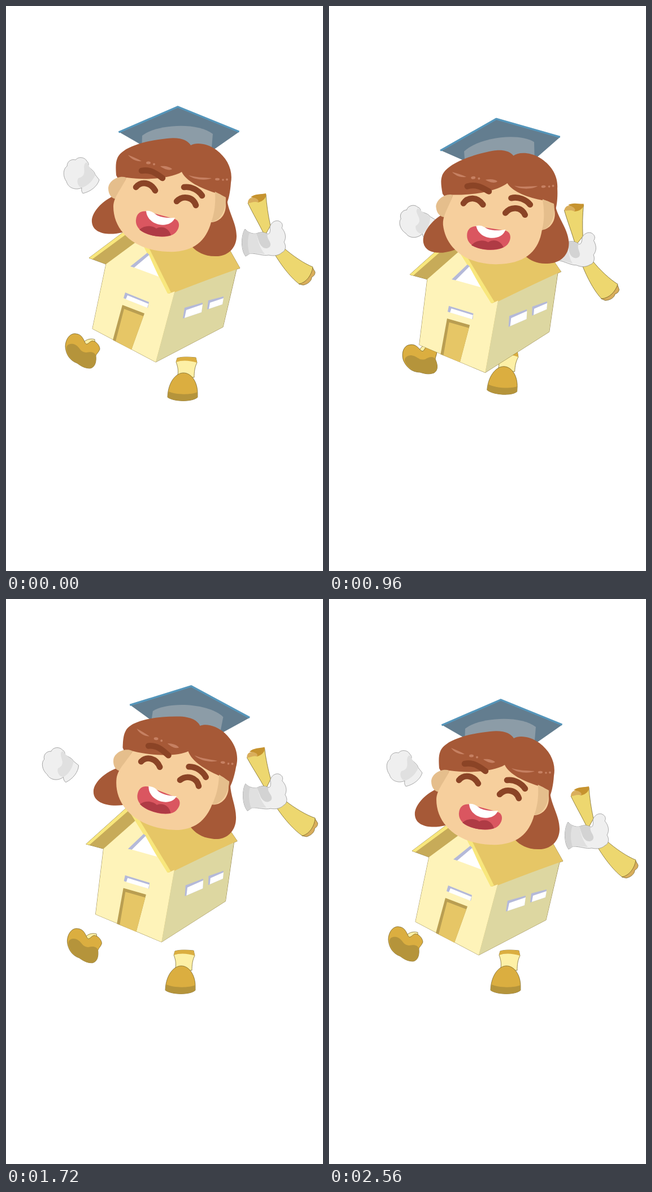
An HTML page for the animation above (2600 ms loop, 561 by 998 pixels).

```html
<!DOCTYPE html>
<html lang="en">
<head>
<meta charset="utf-8">
<style>
  html, body { margin: 0; width: 100%; height: 100%; overflow: hidden; background: #fff; }
  svg { display: block; width: 100%; height: 100%; }
  .line { stroke: #6b5a20; stroke-width: .7; }
  .glove { fill: #efefef; stroke: #888; stroke-width: .7; }
  .gold { fill: #dbae40; }
  .sole { fill: #b5943b; }
  .cream { fill: #fdf0a6; }
  .roll { fill: #edd76f; }
  .tan { fill: #d9ae5c; }
  .roof { fill: #e6c666; }
  .edge { fill: #f8e77d; }
  .lilac { fill: #b4b9d9; }
  .white { fill: #fff; }
  .hair { fill: #a65937; }
  .skin { fill: #f6cf9d; }
  .shade { fill: #e5be8c; }
  .brow { fill: none; stroke: #8b4426; stroke-width: 10.5; stroke-linecap: round; }
  .shine { fill: #c68062; }
</style>
</head>
<body>
<svg viewBox="0 0 561 998">
  <g id="leftHand">
    <path class="glove" d="M107 310C100 301 101 287 108 283C108 272 119 270 123 272C128 265 140 267 143 274C146 276 147 281 145 283C150 288 156 291 158 298L165 307C162 318 150 328 136 331C134 328 133 326 134 321C124 326 110 322 107 310Z"/>
    <path fill="#e0e0e0" d="M143 276C131 280 148 300 128 304C124 310 128 320 134 321C145 318 154 308 158 298C153 291 148 286 143 276Z"/>
  </g>
  <g id="rightHand">
    <path class="roll line" d="M428 348C434 342 450 340 460 333C461 350 464 370 468 388L458 406C448 385 436 365 428 348Z"/>
    <path fill="#c6932f" d="M433 338C440 331 452 333 460 331C462 338 455 345 446 347C440 340 437 338 433 338Z"/>
    <path class="tan" d="M428 348C428 340 434 337 440 339C446 341 448 344 446 347C439 344 433 349 428 348Z"/>
    <path class="tan line" d="M542 461L547 470C547 474 545 477 541 479C541 485 535 491 526 493L518 491Z"/>
    <path class="roll line" d="M474 436L490 426C508 442 528 455 543 461C541 475 532 488 519 491C506 482 488 460 474 436Z"/>
    <path class="glove" d="M443 402C452 398 458 400 462 402C468 405 468 395 467 390C470 380 480 377 485 381C490 384 490 389 488 392C494 399 497 408 492 417C497 425 494 433 489 435C480 443 470 441 465 440C455 442 445 437 432 437L424 442C415 430 416 405 423 394C428 400 436 403 443 402Z"/>
    <path fill="#e0e0e0" d="M423 395C428 401 436 403 443 402C446 412 447 425 458 438C450 438 444 436 432 437L424 441C416 430 416 406 423 395Z"/>
    <path fill="#d3d3d3" d="M443 402C452 399 458 401 463 403C460 411 472 418 467 425C460 432 451 426 448 417ZM423 395L431 400C427 411 427 425 431 438L424 441C416 430 416 406 423 395Z"/>
  </g>
  <g id="leftFoot">
    <path class="cream line" d="M137 594C143 588 151 587 157 589L158 603L140 606Z"/>
    <path class="gold line" d="M105 602C105 588 114 577 124 579C133 580 136 586 140 595C144 602 149 589 155 592C160 593 166 600 166 606C164 612 160 614 159 618C160 628 158 638 149 640C139 640 133 636 126 631C112 626 106 614 105 602Z"/>
    <path class="sole" d="M107 604C107 597 116 595 122 598C132 603 130 611 142 612C152 610 158 612 159 618C160 628 158 638 149 640C139 640 133 636 126 631C114 626 107 614 107 604Z"/>
  </g>
  <g id="rightFoot">
    <path class="cream line" d="M303 622C312 619 326 620 336 621L338 630C334 638 333 646 333 656L303 656C306 645 304 637 301 629Z"/>
    <path class="gold" d="M303 622C312 619 326 620 336 621L338 630C325 626 312 625 301 629Z"/>
    <path class="gold line" d="M286 690C287 664 301 648 314 648C328 648 339 664 339 684L339 691C330 700 296 699 286 691Z"/>
    <path class="sole" d="M286 691L288 681C300 687 328 687 339 682L339 691C330 700 296 699 286 691Z"/>
  </g>
  <g id="house">
    <path class="roof line" stroke-linejoin="round" d="M147 445L223 388L371 387L414 463L408 465L384 567L265 629L153 570L177 456Z"/>
    <path fill="#c7ab59" d="M147 445L177 456L240 411L226 388Z"/>
    <path class="edge" d="M147 445L223 388L228 392L153 447Z"/>
    <path fill="#fef3b9" d="M177 456L153 570L265 629L299 503L238 411Z"/>
    <path fill="#ddd7a1" d="M298 506L408 464L384 567L265 629Z"/>
    <path class="roof" d="M288 508L414 463L371 387L228 388Z"/>
    <path class="edge" d="M292 506L286 508L226 390L233 387Z"/>
    <path class="lilac" d="M220 460L250 436L254 440L227 462Z"/>
    <path class="white" d="M227 462L253 440L270 478Z"/>
    <path class="lilac" d="M211 506L253 523L251 533L208 516Z"/>
    <path class="white" d="M215 511L252 526L250 533L212 518Z"/>
    <path fill="#b99e52" d="M206 528L245 543L222 607L189 590Z"/>
    <path class="roof" d="M209 535L243 548L222 607L194 592Z"/>
    <path class="lilac" d="M316 533L348 524L346 541L313 552ZM358 520L385 513L383 527L356 536Z"/>
    <path class="white" d="M319 537L348 527L346 541L316 551ZM361 524L385 516L383 527L359 535Z"/>
  </g>
  <g id="head">
    <path class="hair" d="M202 331C172 340 150 365 152 382C154 402 180 406 206 400L240 340ZM391 335C390 360 409 382 408 408C407 430 390 443 370 442C350 442 338 434 330 426L350 340Z"/>
    <path fill="#637d8f" d="M304 177L413 222L360 259L246 249L199 222Z"/>
    <path fill="#8c9ca7" d="M240 256L241 229C268 208 340 205 366 226L363 262Z"/>
    <path fill="none" stroke="#5596bb" stroke-width="3.4" stroke-linejoin="round" d="M199.500 223L304 178L412.500 222"/>
    <path class="hair" d="M195 299C194 285 194 276 197 269C204 250 245 238 285 234C310 231 322 238 327 246C337 240 357 243 372 254C392 269 402 290 398 312C397 330 393 345 390 350L340 370L212 330Z"/>
    <path class="shade" d="M213 303C198 298 181 310 181 322C181 334 188 341 196 341Z"/>
    <path class="skin" d="M368 330C380 330 389 338 389 352C389 370 377 383 360 382Z"/>
    <path class="shade" d="M370 328L389 338C390 362 378 382 360 382Z"/>
    <path class="skin" d="M213 303C255 309 295 303 311 293C319 310 345 322 370 330C371 350 369 366 363 382C354 416 330 436 286 434C228 432 190 398 190 354C191 336 203 326 213 303Z"/>
    <path class="brow" d="M240 291C256 288 266 296 277 304M230 320C239 309 256 311 264 326M315 320C328 318 341 326 347 335M302 345C313 334 331 337 336 352"/>
    <path fill="#da5660" d="M230 378C231 365 240 361 250 363L298 376C308 379 308 390 302 398C294 410 268 410 248 402C236 397 229 388 230 378Z"/>
    <path fill="#af3b45" d="M236 395C245 387 258 387 266 393C275 388 288 391 292 405C275 410 250 406 236 395Z"/>
    <path class="white" d="M248 362C250 389 291 395 299 374C288 375 277 374 268 370C262 366 258 361 248 362Z"/>
    <g class="shine">
      <path d="M216 263C224 266 233 270 240 274C230 275 221 270 216 263ZM273 283C282 282 290 284 294 288C288 292 278 287 273 283ZM323 299C336 303 350 303 364 304C354 309 332 307 323 299Z"/>
      <ellipse cx="252" cy="277" rx="4" ry="2.500"/>
      <circle cx="262" cy="279.500" r="2"/>
      <ellipse cx="374" cy="306" rx="4" ry="2.200"/>
      <circle cx="384" cy="307" r="1.800"/>
      <circle cx="391" cy="306.500" r="2"/>
    </g>
  </g>
</svg>
<script>
const LOOP = 2600, CYCLE = 2560, STEP = 40;
const DIP = 640, GATHER = 1280, LEAP = 1720;

// Poses are [x, y, degrees] away from rest; kick swings out and back during the fall
const parts = {
  leftHand: { pivot: [130, 296], dip: [22, 66, -15], gather: [3, 59, -19], leap: [-38, -5, -13] },
  rightHand: { pivot: [487.5, 408.5], dip: [-18, 26, 8], gather: [-15, -9.5, 5.5], leap: [1.5, -71, -3] },
  leftFoot: { pivot: [135.5, 608.5], dip: [16.5, 9, -11], gather: [28, 14, -20], leap: [3.5, 3, -1], kick: [-8, -2, 3] },
  rightFoot: { pivot: [312, 659], dip: [-2.5, -6.5, 2], gather: [-5.5, -12, 3], leap: [-4, 0, 0], kick: [-1, 18, 0] },
  house: { pivot: [281, 500], dip: [0, 10.5, -2.8], gather: [.5, 14.5, -6], leap: [-1, -24, -5], kick: [0, 0, 1.5] },
  head: { pivot: [290, 345], dip: [7, 20.7, -5.4], gather: [10, 5.7, -2.6], leap: [6, -26.5, 6.2] }
};

// Cubic from a to b with the given speeds at both ends
const glide = (a, b, speedA, speedB, u) =>
  a + (b - a) * u * u * (3 - 2 * u) + speedA * u * (1 - u) ** 2 - speedB * u * u * (1 - u);

function move(dip, gather, leap, kick, t) {
  const push = (leap - dip) / (LEAP - DIP);
  if (t < DIP) return dip * (t / DIP) ** 2;
  if (t < GATHER) {
    const span = GATHER - DIP;
    return glide(dip, gather, 2 * dip / DIP * span, push * span, (t - DIP) / span);
  }
  if (t < LEAP) {
    const span = LEAP - GATHER;
    return glide(gather, leap, push * span, 0, (t - GATHER) / span);
  }
  const fall = (t - LEAP) / (CYCLE - LEAP);
  return leap * (1 - fall ** 1.25) + kick * Math.sin(Math.PI * fall);
}

function draw() {
  const t = Math.floor(performance.now() % LOOP / STEP) * STEP % CYCLE;
  for (const [id, { pivot, dip, gather, leap, kick = [0, 0, 0] }] of Object.entries(parts)) {
    const [x, y, angle] = dip.map((d, i) => move(d, gather[i], leap[i], kick[i], t));
    document.getElementById(id).setAttribute("transform", `translate(${x} ${y}) rotate(${angle} ${pivot})`);
  }
  requestAnimationFrame(draw);
}
draw();
</script>
</body>
</html>
```
